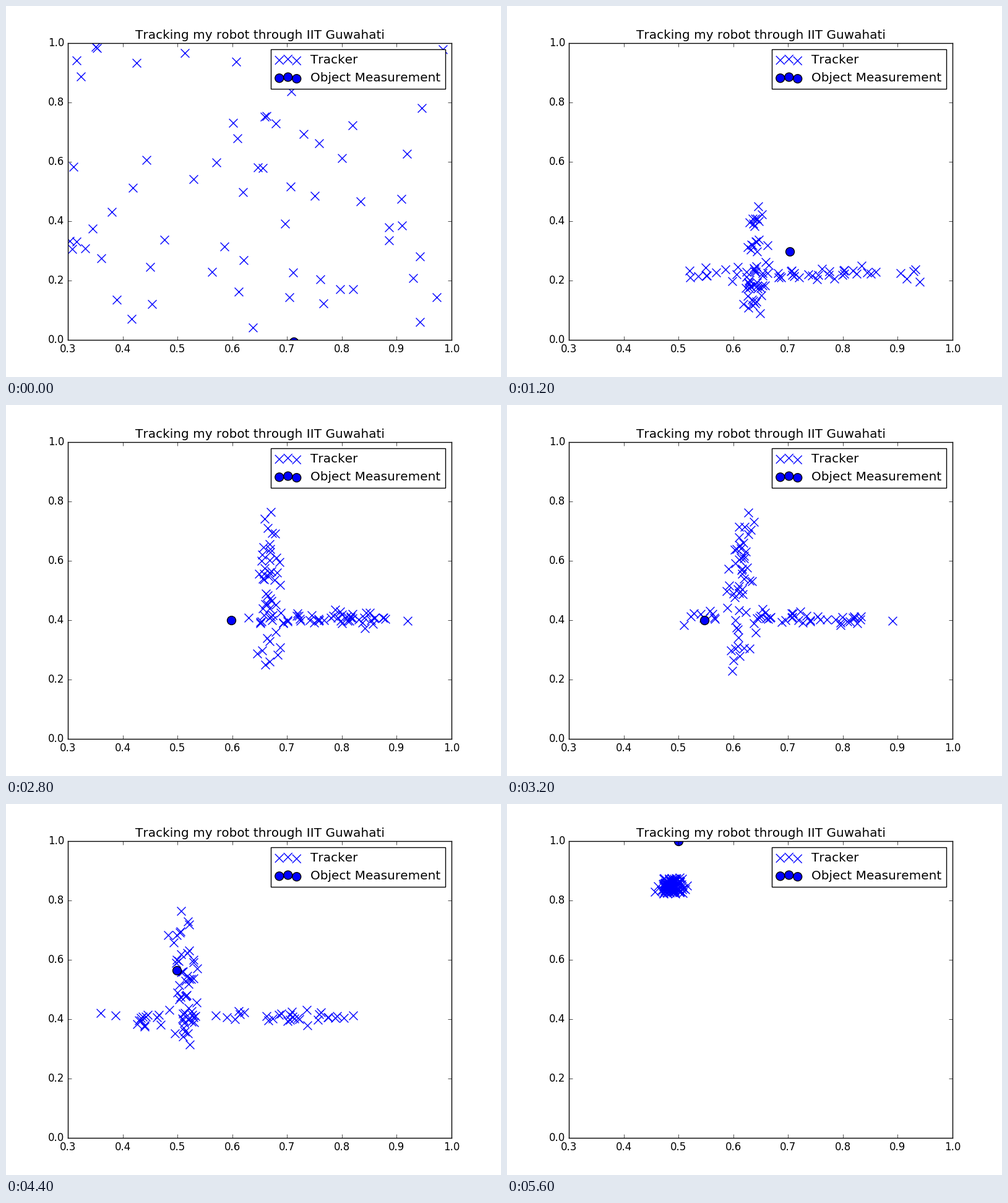
These frames come from a looping animation (800 px wide and 600 px high, 6 s). A matplotlib script:

```python
import numpy as np
import matplotlib.pyplot as plt
from matplotlib.animation import FuncAnimation

STEPS = 15
INTERVAL = 400
SIZE = 100
KEY_STEPS = (1, 3, 5, 7, 9, 11, 13)

plt.style.use("classic")
plt.rcParams["font.family"] = "DejaVu Sans"
plt.rcParams["text.kerning_factor"] = 6


def robot_position(step):
    """Up to 0.4, a short rest, left to 0.5, then up to the top wall."""
    turns = (0, 4, 5, 9, 10, 14)
    x = np.interp(step, turns, (0.712, 0.7, 0.7, 0.496, 0.499, 0.5))
    y = np.interp(step, turns, (-0.006, 0.398, 0.398, 0.4, 0.42, 1.0))
    return x, y


def tracker_center(step):
    """The estimate lags behind the robot."""
    x = np.interp(step, (1, 3, 5, 7, 9, 11, 14),
                  (0.58, 0.637, 0.697, 0.668, 0.567, 0.51, 0.487))
    y = np.interp(step, (2, 5, 11, 14), (0.13, 0.408, 0.405, 0.85))
    return x, y


def bar(rng, low, high, count):
    """Random positions, denser in the middle, that reach both ends."""
    s = rng.beta(2.3, 2.3, count)
    return low + (high - low) * (s - s.min()) / np.ptp(s)


def cross(rng, step, count=49):
    cx, cy = tracker_center(step)
    left = np.interp(step, KEY_STEPS, (0.31, 0.52, 0.64, 0.63, 0.39, 0.36, 0.32))
    right = np.interp(step, KEY_STEPS, (0.76, 0.94, 0.96, 0.92, 0.86, 0.82, 0.78))
    bottom = np.interp(step, KEY_STEPS, (0.07, 0.09, 0.19, 0.25, 0.21, 0.315, 0.5))
    top = np.interp(step, KEY_STEPS, (0.58, 0.45, 0.68, 0.765, 0.76, 0.765, 0.93))
    row = bar(rng, left, right, count), rng.normal(cy, 0.012, count)
    column = rng.normal(cx, 0.012, count), bar(rng, bottom, top, count)
    return np.vstack([np.transpose(row), np.transpose(column)])


def particles(step):
    rng = np.random.default_rng(40 + step)
    if step == 0:  # lost anywhere in the room
        return rng.uniform(0, 1, (95, 2))
    if step == STEPS - 1:  # converged
        x, y = tracker_center(step)
        return np.column_stack([rng.normal(x, 0.012, 100),
                                rng.uniform(y - 0.027, y + 0.027, 100)])
    return cross(rng, step)


fig = plt.figure(figsize=(8, 6), dpi=100, facecolor="white")
ax = fig.add_axes([0.125, 0.1, 0.775, 0.8])
tracker = ax.scatter([], [], s=SIZE, marker="x", color="blue",
                     linewidths=1, label="Tracker")
robot = ax.scatter([], [], s=SIZE, marker="o", facecolors="blue",
                   edgecolors="black", linewidths=1,
                   label="Object Measurement")
ax.set_title("Tracking my robot through IIT Guwahati")
ax.set_xticks(np.linspace(0.3, 1.0, 8))
ax.set_yticks(np.linspace(0.0, 1.0, 6))
ax.set_xlim(0.3, 1.0)
ax.set_ylim(0.0, 1.0)
ax.legend(loc="upper right")


def update(step):
    robot.set_offsets([robot_position(step)])
    tracker.set_offsets(particles(step))
    return tracker, robot


anim = FuncAnimation(fig, update, frames=STEPS, interval=INTERVAL,
                     repeat=True, repeat_delay=0)
plt.show()
```
